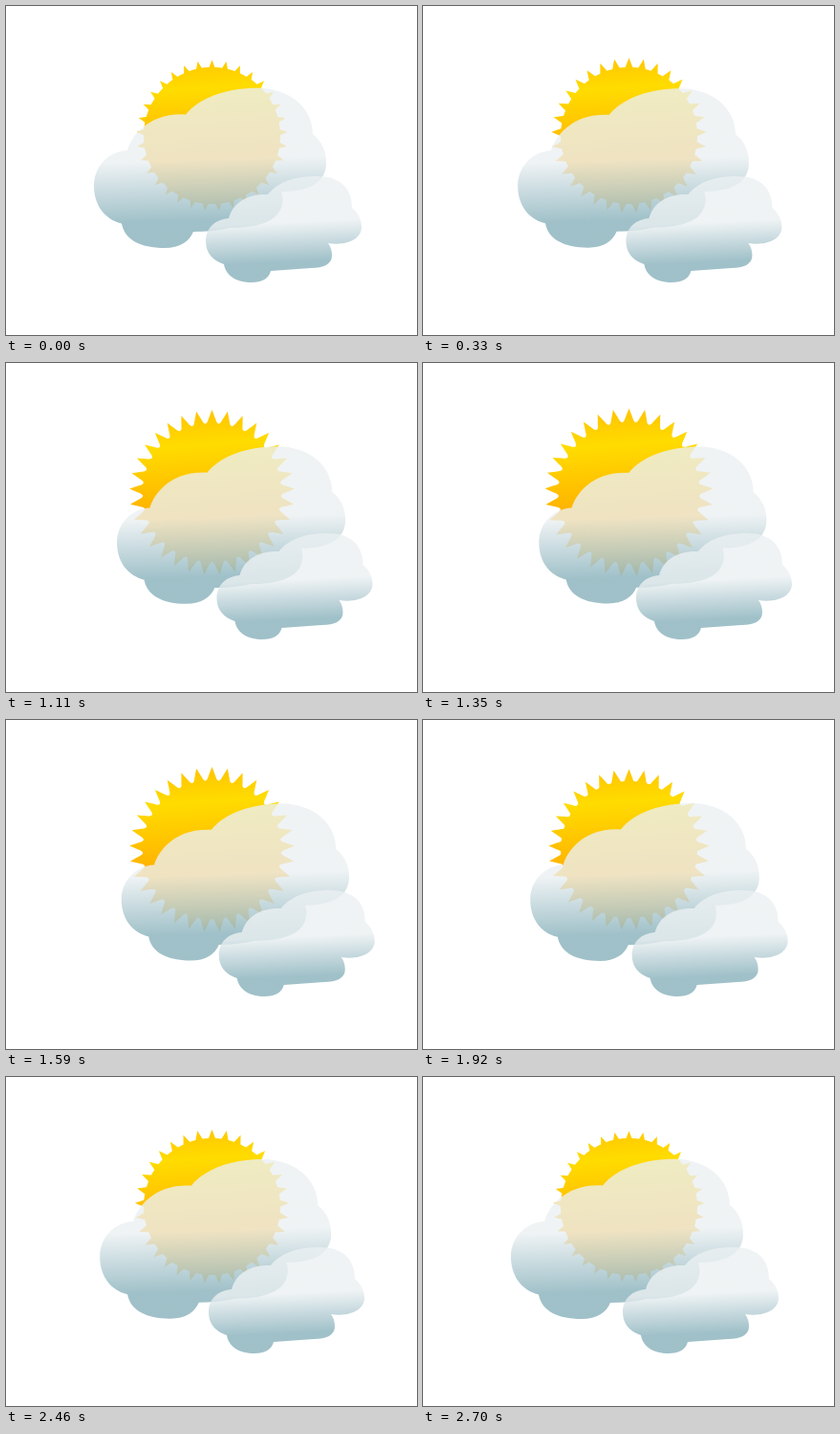
These frames come from a looping animation (430 px wide and 344 px high, 2.73 s). An HTML page:

```html
<!DOCTYPE html>
<html lang="en">
<head>
<meta charset="utf-8">
<title>Sun and clouds</title>
<style>
  html, body { margin: 0; width: 100%; height: 100%; overflow: hidden; background: #fff; }
  svg { display: block; width: 430px; height: 344px; }
</style>
</head>
<body>
<svg viewBox="0 0 430 344">
  <defs>
    <linearGradient id="sunFill" gradientUnits="userSpaceOnUse" x1="212" y1="56" x2="222" y2="208">
      <stop offset="0" stop-color="#ffc800"/>
      <stop offset=".19" stop-color="#ffdc00"/>
      <stop offset=".67" stop-color="#ffae00"/>
      <stop offset="1" stop-color="#ffc450"/>
    </linearGradient>
    <linearGradient id="bigFill" gradientUnits="userSpaceOnUse" x1="212" y1="86" x2="216" y2="224">
      <stop offset="0" stop-color="#ebf0f2"/>
      <stop offset=".54" stop-color="#ebf0f2"/>
      <stop offset="1" stop-color="#88b1bb"/>
    </linearGradient>
    <linearGradient id="smallFill" gradientUnits="userSpaceOnUse" x1="286" y1="178" x2="290" y2="268">
      <stop offset="0" stop-color="#ebf0f2"/>
      <stop offset=".54" stop-color="#ebf0f2"/>
      <stop offset="1" stop-color="#88b1bb"/>
    </linearGradient>
  </defs>
  <g fill="url(#sunFill)">
    <path id="rays"/>
    <circle cx="215.5" cy="135.5" r="71.5"/>
  </g>
  <path id="big" fill="url(#bigFill)" fill-opacity=".8" d="M92 188
    C92 168 107 152 127 151 C131 136 150 111 188 113.5
    C203 95 232 85.5 264 85.7 C296 86 321 106 321 134
    C331 142 335 152 335 164 C335 184 318 194 288 194
    C290 200 290 207 287 213 C281 226 262 232 234 232
    C221 235 209 236 196 236 C192 246 182 253 166 253
    C140 253 124 244 121 227.5 C103 223 92 208 92 188Z"/>
  <path id="small" fill="url(#smallFill)" fill-opacity=".8" d="M209 246
    C209 232 219 223 233 222 C238 205 253 196 274 197
    C285 183 304 178 325 178 C350 178 362 191 362 211
    C369 217 372 224 372 231 C372 243 358 251 337 248
    C340 252 341 256 341 261 C341 270 332 274 319 274
    L277 277 C275 285 268 289 257 289
    C241 289 230 282 228 270 C216 266 209 258 209 246Z"/>
</svg>
<script>
const LOOP = 2730, STEP = 30, END = 2700;
const RAY_PEAK = 1350, CLOUD_PEAK = 1470;
const RAYS = 33, CX = 215.5, CY = 135.5;
const [rays, big, small] = ['rays', 'big', 'small'].map(id => document.getElementById(id));

// Linear rise to 1 at the peak, then linear fall back to 0.
const swing = (t, peak) => t < peak ? t / peak : (END - t) / (END - peak);

const polar = (r, a) =>
  `${(CX + r * Math.sin(a)).toFixed(2)} ${(CY - r * Math.cos(a)).toFixed(2)}`;

function starburst(tip) {
  const scale = tip / 79, gap = 2 * Math.PI / RAYS;
  const side = 70.5 * scale, valley = 62 * scale;
  let d = '';
  for (let i = 0; i < RAYS; i++) {
    const a = i * gap;
    d += `${i ? 'L' : 'M'}${polar(tip, a)}L${polar(side, a + gap * .25)}`
       + `Q${polar(valley, a + gap / 2)} ${polar(side, a + gap * .75)}`;
  }
  return d + 'Z';
}

function draw(now) {
  const t = Math.floor((now % LOOP) / STEP) * STEP;
  const p = swing(t, CLOUD_PEAK);
  const s = 1 - .022 * p;
  rays.setAttribute('d', starburst(79 + 9 * swing(t, RAY_PEAK)));
  big.setAttribute('transform',
    `translate(${92 + 31.9 * p} 180) scale(${s}) translate(-92 -180)`);
  small.setAttribute('transform', `translate(${15.2 * p} 0)`);
}

let start;
function frame(now) {
  start ??= now;
  draw(now - start);
  requestAnimationFrame(frame);
}
draw(0);
requestAnimationFrame(frame);
</script>
</body>
</html>
```
